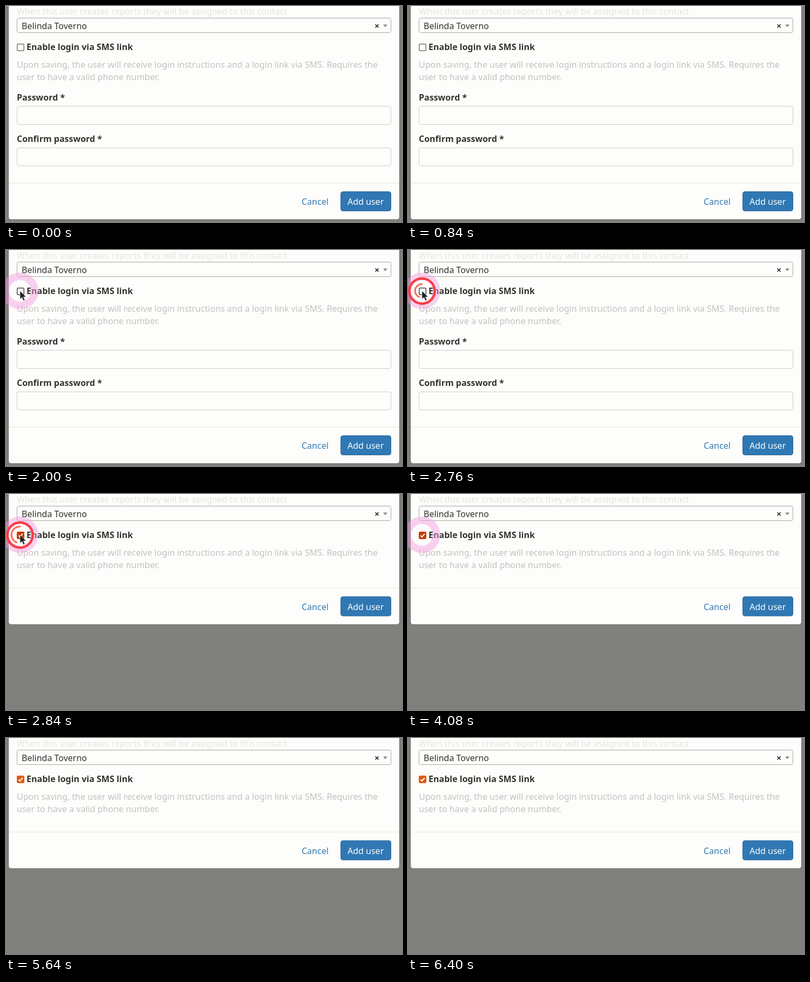
Animation, 734 px wide and 402 px high, one loop 6.44 s. Source, as an HTML page:

```html
<!DOCTYPE html>
<html lang="en">
<head>
<meta charset="utf-8">
<title>Add user form</title>
<style>
  html, body { margin: 0; width: 100%; height: 100%; overflow: hidden; background: #80807d; }
  svg { display: block; width: 734px; height: 402px; }
  text { font: 16px "Noto Sans", "Open Sans", sans-serif; fill: #333330; white-space: pre; }
  .label { font-weight: 700; }
  .hint { fill: #c2c2c0; }
  .faded { fill: #e4e4de; }
  .input { fill: #fdfdfb; stroke: #ccccc6; }
  .link { fill: #337ab2; }
  .light { fill: #fafcfc; }
</style>
</head>
<body>
<svg viewBox="0 0 734 402">
  <rect width="734" height="402" fill="#80807d"/>
  <rect id="panel" x="4.5" y="-20" width="725" height="417.5" rx="5" fill="#fdfdfb" stroke="#6a6a66"/>

  <text class="faded" x="20" y="16">When this user creates reports they will be assigned to this contact</text>
  <rect x="20.5" y="22.5" width="693" height="27" rx="3" fill="#fdfdfb" stroke="#a6a6a2"/>
  <text x="29" y="43">Belinda Toverno</text>
  <text class="label" x="683" y="43">×</text>
  <path d="M699 34.5h8l-4 5z" fill="#8c8c88"/>

  <rect id="box" x="20.75" y="70.75" width="12.5" height="12.5" rx="2" stroke-width="1.5"/>
  <path id="tick" d="M23.3 77.2l2.6 2.8 5-5.8" fill="none" stroke="#fffffa" stroke-width="2"/>
  <text class="label" x="38" y="82">Enable login via SMS link</text>
  <text class="hint" x="20" y="115">Upon saving, the user will receive login instructions and a login link via SMS. Requires the</text>
  <text class="hint" x="20" y="138">user to have a valid phone number.</text>

  <g id="passwords">
    <text class="label" x="20" y="176">Password *</text>
    <rect class="input" x="20.5" y="186.5" width="693" height="34" rx="3"/>
    <text class="label" x="20" y="253">Confirm password *</text>
    <rect class="input" x="20.5" y="264" width="693" height="33.5" rx="3"/>
  </g>

  <g id="footer">
    <path d="M5 329.5H729" stroke="#e8e8dc"/>
    <text class="link" x="548" y="370">Cancel</text>
    <rect x="620.5" y="345.5" width="93" height="36" rx="4" fill="#3078b4" stroke="#2a6898"/>
    <text class="light" x="633" y="370">Add user</text>
  </g>

  <g id="pointer">
    <circle r="27" fill="none" stroke="#f2a0e0" stroke-width="14" opacity=".48"/>
    <circle id="ripple" cy=".4" fill="none" stroke="#fc3c44" stroke-width="4.5"/>
    <path id="echo" fill="none" stroke="#fa6a58" stroke-width="3"/>
    <path id="arrow" d="M0 0v15.5l3.6-3.2 2.6 6 2.8-1.2-2.6-5.8h4.8z" fill="#222220" stroke="#f4f4f0" stroke-width=".6"/>
  </g>
</svg>
<script>
const LOOP = 6440, STEP = 40;
const ENTER = 1080, PRESS = 2600, TOGGLE = 2800, HIDE_ARROW = 3440, LEAVE = 5360;
const GROW = 140, RING_FADE = 280, RING_END = 440;
const SHRINK = 154.5;

// Pointer x as [time, x] stops; y stays on the checkbox row.
const PATH = [[ENTER, -34], [1280, 13], [1800, 26], [5200, 26], [LEAVE, -34]];
const CHECKBOX_LEFT = 20;

const el = {};
document.querySelectorAll('[id]').forEach(node => el[node.id] = node);

const clamp = v => Math.max(0, Math.min(1, v));
const easeOut = v => 1 - (1 - clamp(v)) ** 2;
const set = (node, attrs) => {
  for (const key in attrs) node.setAttribute(key, attrs[key]);
};
const show = (node, on) => set(node, { visibility: on ? 'inherit' : 'hidden' });

function pointerX(t) {
  let x = PATH[0][1];
  for (let i = 1; i < PATH.length; i++) {
    const [t0, x0] = PATH[i - 1], [t1, x1] = PATH[i];
    if (t >= t0) x = x0 + (x1 - x0) * easeOut((t - t0) / (t1 - t0));
  }
  return x;
}

function drawForm(t, hover) {
  const checked = t >= TOGGLE;
  const color = checked ? (hover ? '#c83c08' : '#e6580e') : (hover ? '#484844' : '#747470');
  set(el.box, { fill: checked ? color : '#fdfdfb', stroke: color });
  show(el.tick, checked);
  show(el.passwords, !checked);
  set(el.panel, { height: checked ? 417.5 - SHRINK : 417.5 });
  set(el.footer, { transform: `translate(0 ${checked ? -SHRINK : 0})` });
}

function drawRings(age) {
  const active = age >= 0 && age < RING_END;
  const opacity = clamp((RING_END - age) / (RING_END - RING_FADE));
  const r = 23.5 * easeOut(age / GROW);
  const inner = 15.5 * easeOut((age - 80) / GROW);
  show(el.ripple, active);
  show(el.echo, active && inner > 0);
  set(el.ripple, { r, opacity });
  set(el.echo, {
    d: `M1 ${-inner}A${inner} ${inner} 0 0 0 ${-inner * .35} ${inner * .94}`,
    opacity
  });
}

function drawPointer(t, x) {
  show(el.pointer, t >= ENTER && t < LEAVE);
  set(el.pointer, { transform: `translate(${x} 76)` });
  show(el.arrow, t < HIDE_ARROW);
  drawRings(t - PRESS);
}

function render(now) {
  const t = Math.floor((now % LOOP) / STEP) * STEP;
  const x = pointerX(t);
  drawForm(t, x >= CHECKBOX_LEFT);
  drawPointer(t, x);
}

const start = performance.now();
function tick() {
  render(performance.now() - start);
  requestAnimationFrame(tick);
}
tick();
</script>
</body>
</html>
```
